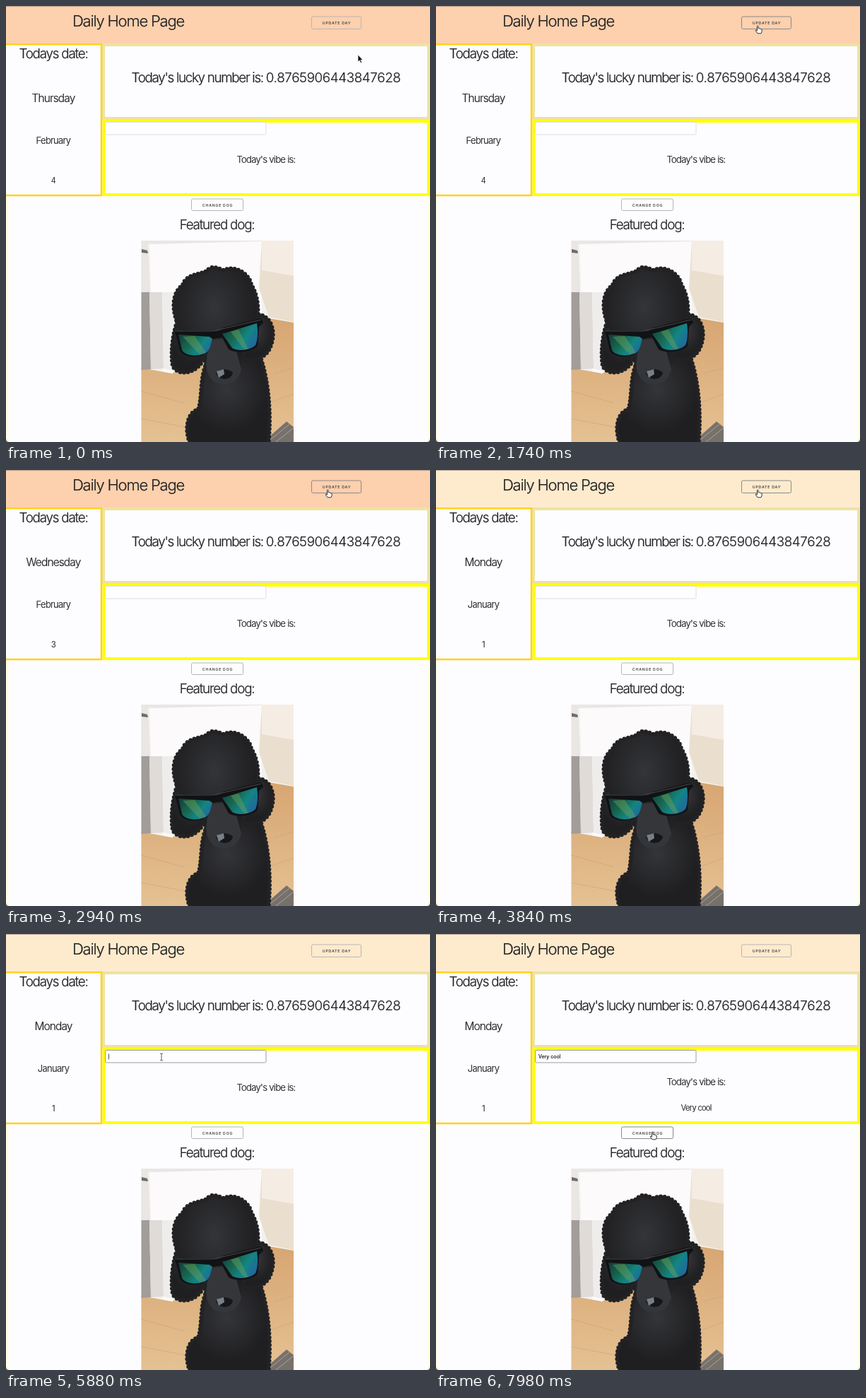
These frames come from a looping animation (600 by 617 pixels, 8000 ms). An HTML page:

```html
<!DOCTYPE html>
<html lang="en">
<head>
<meta charset="utf-8">
<title>Daily Home Page</title>
<style>
  html, body { margin: 0; width: 100%; height: 100%; overflow: hidden; background: #fdfcfe; }
  svg { display: block; width: 100vw; height: 100vh; }
  text {
    font-family: Inter, Roboto, sans-serif;
    font-optical-sizing: none;
    font-weight: 300;
    fill: #222;
    stroke: #222;
    stroke-width: .22px;
    text-anchor: middle;
    white-space: pre;
  }
  .title { font-size: 22px; letter-spacing: -1.2px; text-anchor: start; }
  .large { font-size: 18.8px; letter-spacing: -1.2px; }
  .words { letter-spacing: -1.3px; }
  .digits { letter-spacing: -.35px; }
  .medium { font-size: 15.5px; letter-spacing: -.88px; }
  .small { font-size: 13px; letter-spacing: -.66px; }
  .tiny { font-size: 11px; letter-spacing: -.6px; }
  .label { font-size: 5.3px; letter-spacing: .72px; font-weight: 600; fill: #444; stroke: none; }
  .typed { font-size: 7px; font-weight: 400; text-anchor: start; }
  .button { fill: none; stroke: #b9b4b2; }
  .button.hover { stroke: #8c8988; }
  .cursor { stroke-linejoin: round; }
</style>
</head>
<body>
<svg viewBox="0 0 600 617" preserveAspectRatio="none">
  <defs>
    <clipPath id="photo"><path d="M191.500 332H407V617H191.500Z"/></clipPath>
    <linearGradient id="floor" x2="0" y2="1">
      <stop stop-color="#d7a672"/><stop offset="1" stop-color="#e5c193"/>
    </linearGradient>
    <linearGradient id="lens" x2="1" y2=".5">
      <stop stop-color="#123b3a"/><stop offset=".45" stop-color="#176752"/>
      <stop offset=".75" stop-color="#138584"/><stop offset="1" stop-color="#1f6c9a"/>
    </linearGradient>
    <radialGradient id="fur" cx=".48" cy=".35">
      <stop stop-color="#343539"/><stop offset="1" stop-color="#1f1f21"/>
    </radialGradient>
  </defs>

  <path fill="#fdfcfe" d="M0 0H600V617H0Z"/>
  <path id="header" d="M0 0H600V53H0Z"/>
  <path fill="#8c8179" opacity=".65" d="M0 0H600V1H0Z"/>
  <text class="title" x="94" y="28.500">Daily Home Page</text>
  <rect class="button" id="update" x="432.500" y="15" width="70" height="17.500" rx="2"/>
  <text class="label" x="468" y="25.700">UPDATE DAY</text>

  <g fill="none">
    <path stroke="#ffffe0" stroke-width="3" d="M1.500 269V617M598.500 269V617"/>
    <path stroke="#eee3a0" stroke-width="4" d="M138 55H598V159H138Z"/>
    <path stroke="#ff0" stroke-width="4" d="M138.500 163H598V267H138.500Z"/>
    <path stroke="#ffd21c" stroke-width="2.500" d="M0 54.300H135V268H0"/>
  </g>

  <text class="large" x="67" y="74">Todays date:</text>
  <text class="medium" id="weekday" x="67" y="135.500"></text>
  <text class="small" id="month" x="67" y="195"></text>
  <text class="tiny" id="day" x="67" y="251"></text>
  <text class="large" x="368" y="108"><tspan class="words">Today's lucky number is: </tspan><tspan class="digits">0.8765906443847628</tspan></text>

  <rect id="field" x="140.500" y="164.500" width="227.500" height="17.500" rx="1.500" fill="#fefdff"/>
  <text class="typed" id="typed" x="145" y="176"></text>
  <path id="caret" stroke="#222" stroke-width=".8" d="M0 169.500V177.500"/>
  <text class="small" id="vibeLabel" x="368">Today's vibe is:</text>
  <text class="tiny" id="vibe" x="368.300" y="250"></text>

  <rect class="button" id="change" x="262.500" y="273" width="73" height="16.500" rx="2"/>
  <text class="label" x="299.500" y="283.900">CHANGE DOG</text>
  <text class="large" x="298.500" y="315.500">Featured dog:</text>

  <g clip-path="url(#photo)">
    <path fill="#f3f1ef" d="M191 332H407V617H191Z"/>
    <path fill="#fcfafa" d="M203 337L362 332V520H222L205 405Z"/>
    <path fill="#e9e6e4" d="M191 332H362V333L201 337 204 405H191Z"/>
    <path fill="#706b68" d="M192 344L200 346 201 350 192 349Z"/>
    <path fill="#eadfce" d="M362 332H407V447L372 440 358 400Z"/>
    <path fill="#f5ede3" d="M362 332H407V382L362 374Z"/>
    <path fill="url(#floor)" d="M191 512L235 520 360 440 407 448V617H191Z"/>
    <path fill="#a29d99" d="M191 405H203L205 514 191 515Z"/>
    <path fill="#dedbd8" d="M203 405H221L223 513 205 514Z"/>
    <path fill="#efedeb" d="M221 405H240V518L223 513Z"/>
    <path fill="none" stroke="#c99a69" stroke-width=".8" opacity=".6" d="M191 545L252 562M191 584L254 596M378 520L407 512M377 560L407 549"/>
    <path fill="#77716b" d="M364 617L397 588 407 596V617Z"/>
    <path fill="none" stroke="#aaa39b" d="M370 617L401 592M382 617L407 597"/>

    <g fill="url(#fur)" stroke="#222224" stroke-width="6" stroke-linecap="round" stroke-dasharray="0 5.500">
      <path d="M284 505C274 526 278 555 272 571C255 575 252 603 262 622H371C376 577 371 530 361 500Z"/>
      <path d="M248 432C237 455 232 486 236 510C244 523 264 521 276 506L290 440Z"/>
      <path d="M352 437C373 434 383 458 375 480C369 500 345 506 333 497Z"/>
      <path d="M243 450C233 425 237 404 250 395C254 380 273 380 284 375C291 366 300 371 308 374C325 366 344 379 347 394C357 411 358 429 355 448L344 480C332 494 328 530 305 532C286 529 282 496 274 490Z"/>
    </g>
    <path fill="#35363a" d="M286 477C300 466 321 471 326 489L333 514C329 533 314 537 303 535C288 532 281 516 284 500Z"/>
    <path fill="#17171a" d="M297 520C302 512 316 513 321 519C319 530 302 531 297 520Z"/>
    <path fill="#778087" d="M298 517L308 514 309 521 301 526Z"/>

    <path fill="#111214" d="M238 459L292 459 300 460 308 455 361 442 364 448 358 454 356 481C348 490 324 492 315 486L306 469 292 471 285 491C270 500 250 496 246 488L241 467Z"/>
    <g fill="url(#lens)">
      <path d="M244 465L288 468 292 471C289 483 287 490 281 492C267 497 253 494 249 487Z"/>
      <path d="M306 464L355 449C357 461 356 474 353 480C343 489 327 488 320 484Z"/>
    </g>
    <path fill="#79a552" opacity=".4" d="M250 468L267 467 283 490 274 493ZM318 461L329 458 343 485 337 486Z"/>
    <path fill="none" stroke="#47494c" d="M239 460L293 460 302 458 361 444"/>
  </g>

  <path fill="#66605c" d="M0 612Q0 617 5 617H0ZM600 612Q600 617 595 617H600Z"/>

  <g class="cursor" id="arrow">
    <path fill="#111" stroke="#fff" stroke-width=".7" d="M0 0V10L2.300 8 4 11.800 5.700 11 4 7.400H7Z"/>
  </g>
  <g class="cursor" id="beam">
    <path fill="none" stroke="#333" stroke-width=".8" d="M-2 -5Q0 -5 0 -4Q0 -5 2 -5M0 -4V4M-2 5Q0 5 0 4Q0 5 2 5"/>
  </g>
  <g class="cursor" id="hand">
    <path fill="#fff" stroke="#222" stroke-width=".9" d="M-1.500 1V-4.500Q-.8 -6.200 .1 -4.500V-1.200Q1.200 -2 2 -.8Q3.200 -1.400 3.800 -.2Q5.200 -.5 5.200 1V3L4 5.800H-1L-4 1.600Q-3.500 0 -1.500 2Z"/>
  </g>
</svg>
<script>
  const LOOP = 8000, STEP = 60;
  const MESSAGE = 'Very cool', TYPE_START = 5940, TYPE_GAP = 120;
  const FOCUS = [5640, 7680];
  const $ = id => document.getElementById(id);
  const start = performance.now();

  const dates = [
    { at: 0, weekday: 'Thursday', month: 'February', day: 4, color: '#fdd0ae' },
    { at: 2340, weekday: 'Wednesday', month: 'February', day: 3, color: '#fdd0ae' },
    { at: 3420, weekday: 'Monday', month: 'January', day: 1, color: '#feebcd' }
  ];

  // time, x, y
  const path = [
    [0, 498, 69], [360, 498, 69], [1080, 456, 33], [5100, 456, 33],
    [5580, 220, 174], [7260, 220, 174], [7800, 307, 285], [LOOP, 307, 285]
  ];

  const ease = p => p * p * (3 - 2 * p);
  const show = (id, on) => $(id).setAttribute('visibility', on ? 'visible' : 'hidden');

  function pointer(t) {
    const i = path.findIndex(([time]) => time > t);
    const [t0, x0, y0] = path[i - 1], [t1, x1, y1] = path[i];
    const p = ease((t - t0) / (t1 - t0));
    return [x0 + (x1 - x0) * p, y0 + (y1 - y0) * p];
  }

  function isOver(id, x, y) {
    const { x: left, y: top, width, height } = $(id).getBBox();
    return x >= left && x <= left + width && y >= top && y <= top + height + 1;
  }

  function drawPointer(t) {
    const [x, y] = pointer(t);
    let shape = isOver('field', x, y) ? 'beam' : 'arrow';
    for (const id of ['update', 'change']) {
      const hover = isOver(id, x, y);
      $(id).classList.toggle('hover', hover);
      if (hover) shape = 'hand';
    }
    const hidden = t >= TYPE_START && t < 7260;
    for (const id of ['arrow', 'beam', 'hand']) {
      show(id, id === shape && !hidden);
      $(id).setAttribute('transform', `translate(${x} ${y})`);
    }
  }

  function drawDate(t) {
    const date = dates.findLast(d => d.at <= t);
    for (const key of ['weekday', 'month', 'day']) $(key).textContent = date[key];
    $('header').setAttribute('fill', date.color);
  }

  function drawField(t) {
    const count = Math.max(0, Math.floor((t - TYPE_START) / TYPE_GAP) + 1);
    const value = MESSAGE.slice(0, count);
    $('typed').textContent = $('vibe').textContent = value;
    $('vibeLabel').setAttribute('y', value ? 213.5 : 221.5);
    $('field').setAttribute('stroke', t >= FOCUS[0] ? '#9a9da2' : '#dedde0');

    const typing = t >= TYPE_START && t < TYPE_START + MESSAGE.length * TYPE_GAP;
    const focused = t >= FOCUS[0] && t < FOCUS[1];
    const x = 145.5 + (value ? $('typed').getComputedTextLength() : 0);
    $('caret').setAttribute('transform', `translate(${x} 0)`);
    show('caret', focused && (typing || Math.floor((t - FOCUS[0]) / 500) % 2 === 0));
  }

  function draw() {
    const elapsed = Math.max(0, performance.now() - start) % LOOP;
    const t = Math.floor(elapsed / STEP) * STEP;
    drawDate(t);
    drawField(t);
    drawPointer(t);
    requestAnimationFrame(draw);
  }
  draw();
</script>
</body>
</html>
```
